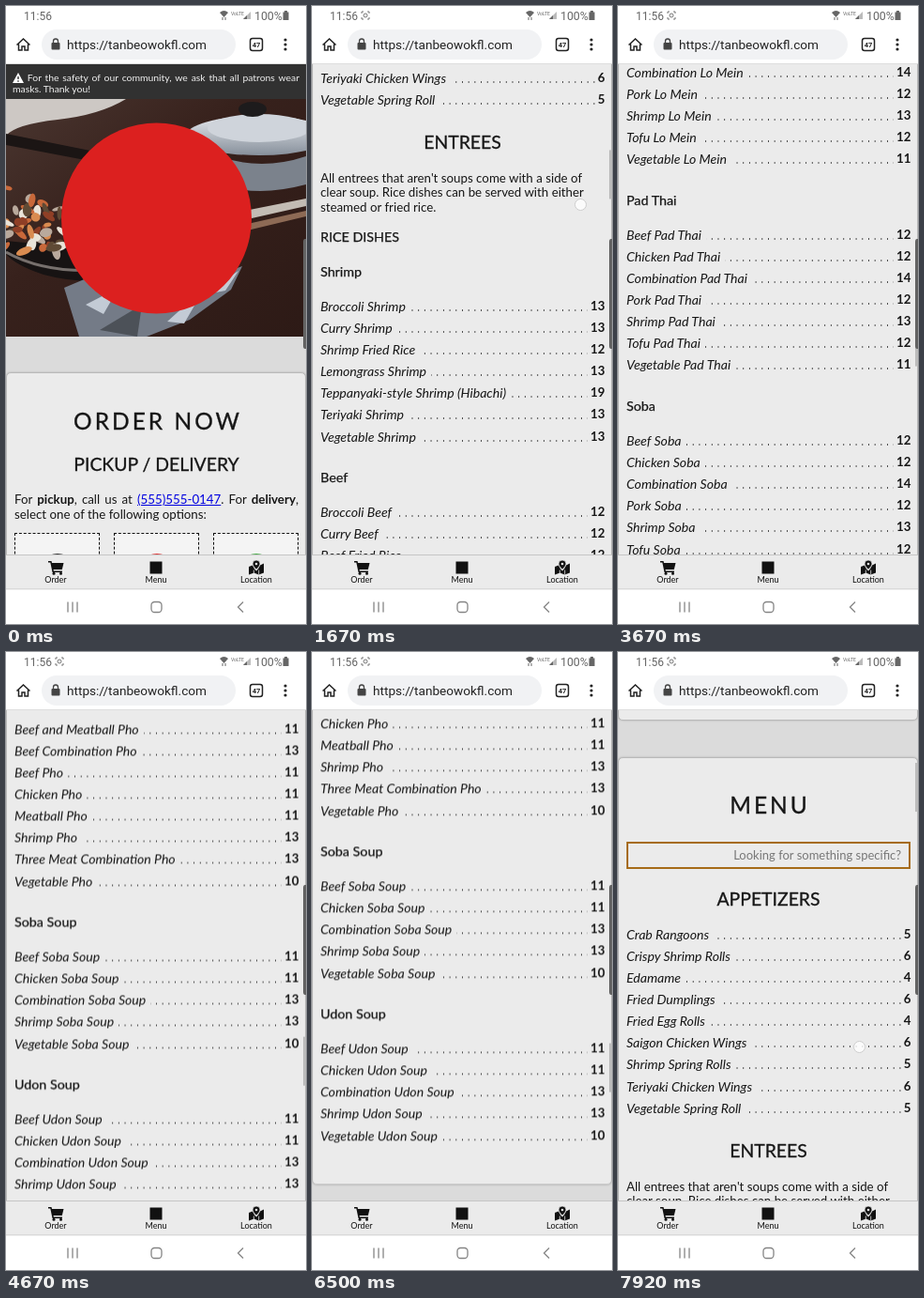
An HTML page for the animation above (8000 ms loop, 320 px wide and 658 px high).

```html
<!DOCTYPE html>
<html lang="en">
<head>
<meta charset="utf-8">
<title>Restaurant page on a phone</title>
<style>
html, body { margin: 0; width: 100%; height: 100%; overflow: hidden; background: #fff; }
#stage { position: relative; width: 320px; height: 658px; overflow: hidden; font: 13.3px Lato, sans-serif; color: #161616; }
#stage svg, #page, #page > *, .abs { position: absolute; }
#view { position: absolute; top: 62px; width: 320px; height: 522px; overflow: hidden; background: #dbdbdb; }
#page { top: -62px; left: 0; width: 320px; height: 5700px; will-change: transform; }
.card { left: 0; width: 318px; background: #ebebeb; border: 1px solid #b9b9b9; border-radius: 5px; box-shadow: 0 0 2px #aaa; }
.text { left: 9px; width: 303px; height: 24px; line-height: 24px; white-space: nowrap; }
.spread { text-align-last: justify; }
.title, .group, .place { -webkit-text-stroke: .3px #161616; }
.title { font-size: 24.5px; letter-spacing: 3px; text-align: center; text-indent: 3px; }
.group { font-size: 19.4px; text-align: center; }
.place { font-size: 19.4px; }
.head { font-size: 14.3px; -webkit-text-stroke: .25px #161616; }
.row { left: 9px; width: 303.5px; height: 23px; line-height: 23px; white-space: nowrap;
  background: radial-gradient(circle at 3.35px 16px, #4a4a4a .5px, #4a4a4a00 .95px) 1px 0 / 6.7px 23px; }
.row i, .row b { background: #ebebeb; display: inline-block; height: 23px; }
.row i { padding-right: 5px; font-size: 14.1px; }
.row b { position: absolute; right: 0; padding-left: 3px; }
a { color: #0000e0; text-decoration: underline; }
.banner { left: 0; top: 62px; width: 320px; height: 37px; background: #313131; }
.small { left: 7px; width: 306px; color: #f0f0f0; font-size: 10.4px; }
.search { left: 9px; top: 813px; width: 291px; height: 25px; padding-right: 8px; border: 2px solid #a66b18; line-height: 25px; text-align: right; font-size: 13px; color: #777; }
.option { top: 561px; width: 89px; height: 89px; border: 1px dashed #111; background: #f4f4f4; }
.option::after { content: ""; position: absolute; left: 24px; top: 21px; width: 42px; height: 42px; border-radius: 50%; background: var(--tone); }
#thumb { right: 0; top: 62px; width: 3px; height: 52px; background: #bcbcbc; }
#touch { left: -6px; top: -6px; width: 11px; height: 11px; border-radius: 50%; background: #fffc; border: 1px solid #ccc; }
</style>
</head>
<body>
<div id="stage">
  <div id="view"><div id="page">
    <div class="banner"></div>
    <svg style="left:0;top:99px" width="320" height="253" viewBox="0 99 320 253">
      <defs>
        <linearGradient id="table" x2="1" y2="1"><stop stop-color="#4a3630"/><stop offset=".4" stop-color="#37211c"/><stop offset="1" stop-color="#2d1a16"/></linearGradient>
        <linearGradient id="steel" x2="0" y2="1"><stop stop-color="#e4e7ec"/><stop offset="1" stop-color="#87909b"/></linearGradient>
      </defs>
      <path d="M0 99H320V352H0z" fill="url(#table)"/>
      <path d="M0 99H128Q100 116 55 121T0 138z" fill="#cdc8c4"/>
      <path d="M0 136L110 158 95 166 0 148z" fill="#1b1514"/>
      <path d="M205 150Q260 180 320 160V190Q260 206 218 185z" fill="#7b828c"/>
      <ellipse cx="270" cy="138" rx="78" ry="21" fill="url(#steel)"/>
      <ellipse cx="270" cy="130" rx="55" ry="15" fill="#cfd4db"/>
      <ellipse cx="263" cy="110" rx="15" ry="8" fill="#1d1b1c"/>
      <path d="M235 222L320 205V213L235 232z" fill="#c3bcb4"/>
      <path d="M240 236L320 218V224L240 243z" fill="#8d6a55"/>
      <path d="M0 250Q90 262 130 215L180 270Q110 305 40 286 10 276 0 264z" fill="#171313"/>
      <path d="M0 262Q50 290 130 278" stroke="#77706d" stroke-width="3" fill="none"/>
      <g id="food"></g>
      <path d="M62 300L100 284 190 300 252 277 240 302 196 334 150 352H78z" fill="#747b87"/>
      <path d="M85 318L120 300 104 328zM172 336L212 300 190 338zM208 308L248 282 234 303z" fill="#c3cbd5"/>
      <path d="M100 345L145 318 140 352z" fill="#4c5158"/>
      <circle cx="160.500" cy="226" r="101.500" fill="#dc201f"/>
    </svg>
  </div>
  <div id="thumb" class="abs" style="top:0"></div></div>

  <svg width="320" height="658" viewBox="0 0 320 658" font-family="Roboto, sans-serif" fill="#222">
    <path d="M0 0H320V62H0z" fill="#fff"/>
    <path d="M0 61.500H320" stroke="#ddd"/>
    <g fill="#666">
      <text x="19" y="14.500" font-size="12">11:56</text>
      <g id="recorder" fill="none" stroke="#777">
        <path d="M53 8V6h2M59 6h2v2M61 12v2h-2M55 14h-2v-2"/>
        <circle id="lens" cx="57" cy="10" r="2"/>
      </g>
      <path d="M228 7q4.500-4 9 0l-4.500 5z"/><path d="M231 12v3M234 15v-3" stroke="#666"/>
      <text x="240" y="9.500" font-size="5">VoLTE</text>
      <path d="M253 14l8-8v8z" fill="#bbb"/><path d="M253 14l4-4v4z"/>
      <text x="265" y="14.500" font-size="12.300">100%</text>
      <path d="M295.500 6.500h1.500V5h3v1.500h1.500V15h-6z"/>
    </g>
    <path d="M11.500 41.500L18.500 35l7 6.500M13.500 40.500v6.500h3.500v-4h3v4h3.500v-6.500" fill="none" stroke="#222" stroke-width="1.500"/>
    <rect x="38" y="25" width="207" height="32" rx="16" fill="#f1f2f4"/>
    <rect x="48.500" y="39" width="9" height="7.500" rx="1" fill="#444"/>
    <path d="M50.500 39v-1.500a2.500 2.500 0 0 1 5 0V39" fill="none" stroke="#444" stroke-width="1.300"/>
    <text x="65" y="46" font-size="13.600">https://tanbeowokfl.com</text>
    <rect x="260.500" y="34.500" width="13" height="13" rx="2.500" fill="none" stroke="#222" stroke-width="1.500"/>
    <text x="267" y="43.600" font-size="7.500" font-weight="700" text-anchor="middle">47</text>
    <circle cx="298" cy="36" r="1.600"/><circle cx="298" cy="41" r="1.600"/><circle cx="298" cy="46" r="1.600"/>

    <path d="M0 584H320V621H0z" fill="#ebebeb"/>
    <path d="M0 584.500H320M0 621H320" stroke="#c6c6c6"/>
    <g fill="#111">
      <path d="M45 591h3.500l.5 2h12.500l-1.700 7H50.500l.4 1.500h9V603H49.500l-2.200-10.500H45z"/>
      <circle cx="51" cy="604.300" r="1.500"/><circle cx="58.500" cy="604.300" r="1.500"/>
      <path d="M153.500 591.500h13v13h-13z"/>
      <path d="M259 597l4-1.500q1 3 4 6 3-3 4-6l4-2v10l-5.500 2-5-2-5.500 2z"/>
      <path d="M267 600q-4-4-4-6a4 4 0 0 1 8 0q0 2-4 6z" stroke="#ebebeb" stroke-width=".7"/>
      <circle cx="267" cy="594" r="1.300" fill="#ebebeb"/>
      <path d="M264.300 600.500v4M269.700 600.500v5" stroke="#ebebeb" stroke-width=".8"/>
      <g font-family="Lato, sans-serif" font-size="9" text-anchor="middle">
        <text x="53" y="613.500">Order</text><text x="160" y="613.500">Menu</text><text x="267" y="613.500">Location</text>
      </g>
    </g>
    <path d="M0 621.500H320V658H0z" fill="#fff"/>
    <g fill="none" stroke="#858585" stroke-width="1.300">
      <path d="M66 634.500v11M71 634.500v11M76 634.500v11M253 634.500l-5.500 5.500 5.500 5.500"/>
      <rect x="155" y="634.500" width="11" height="11" rx="3.500"/>
    </g>
    <path d="M320 248h-1q-2 0-2 3V362q0 3 2 3h1z" fill="#626262"/>
  </svg>
  <div id="touch" class="abs"></div>
</div>
<script>
const $ = id => document.getElementById(id);
const page = $('page');

function add(cls, y, html) {
  const el = document.createElement('div');
  el.className = cls;
  if (y !== undefined) el.style.top = y + 'px';
  el.innerHTML = html || '';
  page.append(el);
  return el;
}
const text = (cls, mid, html) => add('text ' + cls, mid - 12, html);
const card = (top, bottom) => add('card', top).style.height = bottom - top - 2 + 'px';
const phone = '<a>(555)555-0147</a>';

text('small spread', 75.5, '<svg width="12" height="11" style="position:static;vertical-align:-2px" viewBox="0 0 12 11"><path d="M6 0L12 11H0z" fill="#fff"/><path d="M6 4v3M6 8.300v1.400" stroke="#313131" stroke-width="1.400"/></svg> For the safety of our community, we ask that all patrons wear');
text('small', 87.5, 'masks. Thank you!');

card(390, 684);
text('title', 442, 'ORDER NOW');
text('group', 488, 'PICKUP / DELIVERY');
text('spread', 525, `For <b>pickup</b>, call us at ${phone}. For <b>delivery</b>,`);
text('', 541, 'select one of the following options:');
['#333', '#d33', '#4a4'].forEach((tone, i) => {
  const box = add('option');
  box.style.left = 9 + i * 106 + 'px';
  box.style.setProperty('--tone', tone);
});

card(723, 4434);
text('title', 774, 'MENU');
add('search', undefined, 'Looking for something specific?');
text('group', 874, 'APPETIZERS');

// The menu flows down from here; y is the middle of the latest line.
let y = 911 - 23.15;
function items(list, price) {
  list.split('|').forEach(entry => {
    const [name, own] = entry.split(':');
    y += 23.15;
    add('row', y - 11.5, `<i>${name}</i><b>${own || price}</b>`);
  });
}
function section(name, list, price, gap = 44) {
  text('head', y += gap, name);
  y += 36.4 - 23.15;
  items(list, price);
}
const heading = name => text('head', y += 39.4, name);
const each = (kinds, dish) => kinds.replace(/[^|:]+(?=:|\||$)/g, s => isNaN(s) ? s + ' ' + dish : s);

items('Crab Rangoons:5|Crispy Shrimp Rolls|Edamame:4|Fried Dumplings|Fried Egg Rolls:4|Saigon Chicken Wings|Shrimp Spring Rolls:5|Teriyaki Chicken Wings|Vegetable Spring Roll:5', 6);
text('group', y += 45.4, 'ENTREES');
["All entrees that aren't soups come with a side of", 'clear soup. Rice dishes can be served with either', 'steamed or fried rice.']
  .forEach((line, i) => text('', 1179.5 + i * 15.6, line));
y = 1243 - 39.4;
heading('RICE DISHES');
section('Shrimp', 'Broccoli Shrimp|Curry Shrimp|Shrimp Fried Rice:12|Lemongrass Shrimp|Teppanyaki-style Shrimp (Hibachi):19|Teriyaki Shrimp|Vegetable Shrimp', 13, 36.7);
section('Beef', 'Broccoli Beef|Curry Beef|Beef Fried Rice|Lemongrass Beef|Mongolian Beef|Pepper Steak|Teppanyaki-style Steak (Hibachi):18|Teriyaki Beef', 12);
section('Chicken', 'Broccoli Chicken|Curry Chicken|Chicken Fried Rice|General Chicken|Lemongrass Chicken|Mongolian Chicken|Pepper Steak Chicken|Sweet and Sour Chicken|Teppanyaki-style Chicken (Hibachi):15|Teriyaki Chicken', 11);
section('Pork', 'Pork Fried Rice', 12);
section('Vegetable', 'Curry Vegetables|Vegetable Fried Rice:10|Teriyaki Vegetables|Vegetable Delight', 11);
section('Combination', 'Combination Fried Rice:13|' + ['Chicken and Shrimp', 'Chicken and Steak', 'Salmon and Shrimp', 'Steak and Shrimp'].map(s => `Teppanyaki-style ${s} (Hibachi)`).join('|'), 22);
heading('NOODLES');
section('Bun', each('Beef|Chicken|Combination:14|Eggroll|Pork|Shrimp:13|Tofu|Vegetable:11', 'Bun'), 12, 36.7);
for (const dish of ['Chow Fun', 'Lo Mein', 'Pad Thai', 'Soba', 'Udon'])
  section(dish, each('Beef|Chicken|Combination:14|Pork|Shrimp:13|Tofu|Vegetable:11', dish), 12);
heading('SOUPS');
section('Pho', each('Beef and Meatball|Beef Combination:13|Beef|Chicken|Meatball|Shrimp:13|Three Meat Combination:13|Vegetable:10', 'Pho'), 11, 36.7);
for (const dish of ['Soba Soup', 'Udon Soup'])
  section(dish, each('Beef|Chicken|Combination:13|Shrimp:13|Vegetable:10', dish), 11);

card(4472.5, 5660);
text('title', 4524, 'LOCATION');
text('place', 4570.5, 'HALVERN ISLAND');
text('head', 4607.5, 'Address');
text('', 4640, '4275 Mill Garden Blvd. Halvern Island, FL 00000');
text('head', 4672, 'Phone Number');
text('', 4704.5, phone);
text('head', 4736.5, 'Hours');
text('', 4767, 'All Week');
text('', 4783, '11:00 AM - 9:00 PM');

// Chopped vegetables in the pan
let seed = 7;
const random = () => (seed = seed * 16807 % 2147483647) / 2147483647;
const tones = ['#c8683a', '#e9e3d8', '#8f3f26', '#d98b50', '#5f4a35', '#b9a99c'];
$('food').innerHTML = Array.from({length: 46}, (_, i) => {
  const x = random() * 62, top = 182 + x * .5, cy = top + random() * (262 - top);
  return `<ellipse cx="${x}" cy="${cy}" rx="${4 + random() * 5}" ry="${2 + random() * 3}" fill="${tones[i % 6]}" transform="rotate(${random() * 180} ${x} ${cy})"/>`;
}).join('');

// Times are in ticks, twelve to the second.
const scrollKeys = [[0, 0], [4, 0], [7, 230], [10, 540], [13, 730], [17, 800], [20, 997], [24, 1480], [28, 1900],
  [33, 2110.8], [36, 2310], [40, 2700], [45, 3000], [48, 3210], [52, 3600], [56, 3791.5], [60, 3833], [67, 3833],
  [70, 4180.5], [73, 4430], [74, 4440], [77, 4170], [80, 3260], [85, 1722.7], [89, 1060], [93, 771], [95, 611], [96, 560]];
const swipes = [
  [4, 262, 430, 7, 285, 200], [17, 265, 400, 20, 286, 211], [33, 252, 399, 36, 278, 200],
  [45, 255, 410, 48, 280, 200], [67, 265, 400, 70, 292, 52], [74, 262, 200, 77, 245, 470], [93, 270, 260, 95, 257, 420]];
const mix = (a, b, k) => a + (b - a) * k;

function scrollAt(tick) {
  const i = scrollKeys.findIndex(key => key[0] > tick);
  const [t0, s0] = scrollKeys[i - 1], [t1, s1] = scrollKeys[i];
  return mix(s0, s1, (tick - t0) / (t1 - t0));
}

function draw(ms) {
  const tick = Math.floor(ms * .012 + .06) % 96;
  const scroll = scrollAt(tick);
  page.style.transform = `translateY(${-scroll}px)`;
  $('thumb').style.transform = `translateY(${scroll * .0917}px)`;
  $('thumb').style.opacity = scroll > 0 ? 1 : 0;
  $('recorder').style.opacity = tick < 6 ? 0 : 1;
  $('lens').style.opacity = tick % 24 >= 12 && tick % 24 < 18 ? 0 : 1;
  const swipe = swipes.find(s => tick >= s[0] && tick <= s[3]);
  $('touch').style.opacity = swipe ? 1 : 0;
  if (swipe) {
    const [t0, x0, y0, t1, x1, y1] = swipe, k = (tick - t0) / (t1 - t0);
    $('touch').style.transform = `translate(${mix(x0, x1, k)}px, ${mix(y0, y1, k)}px)`;
  }
}

const start = performance.now();
function loop() {
  draw((performance.now() - start) % 8000);
  requestAnimationFrame(loop);
}
draw(0);
requestAnimationFrame(loop);
</script>
</body>
</html>
```
